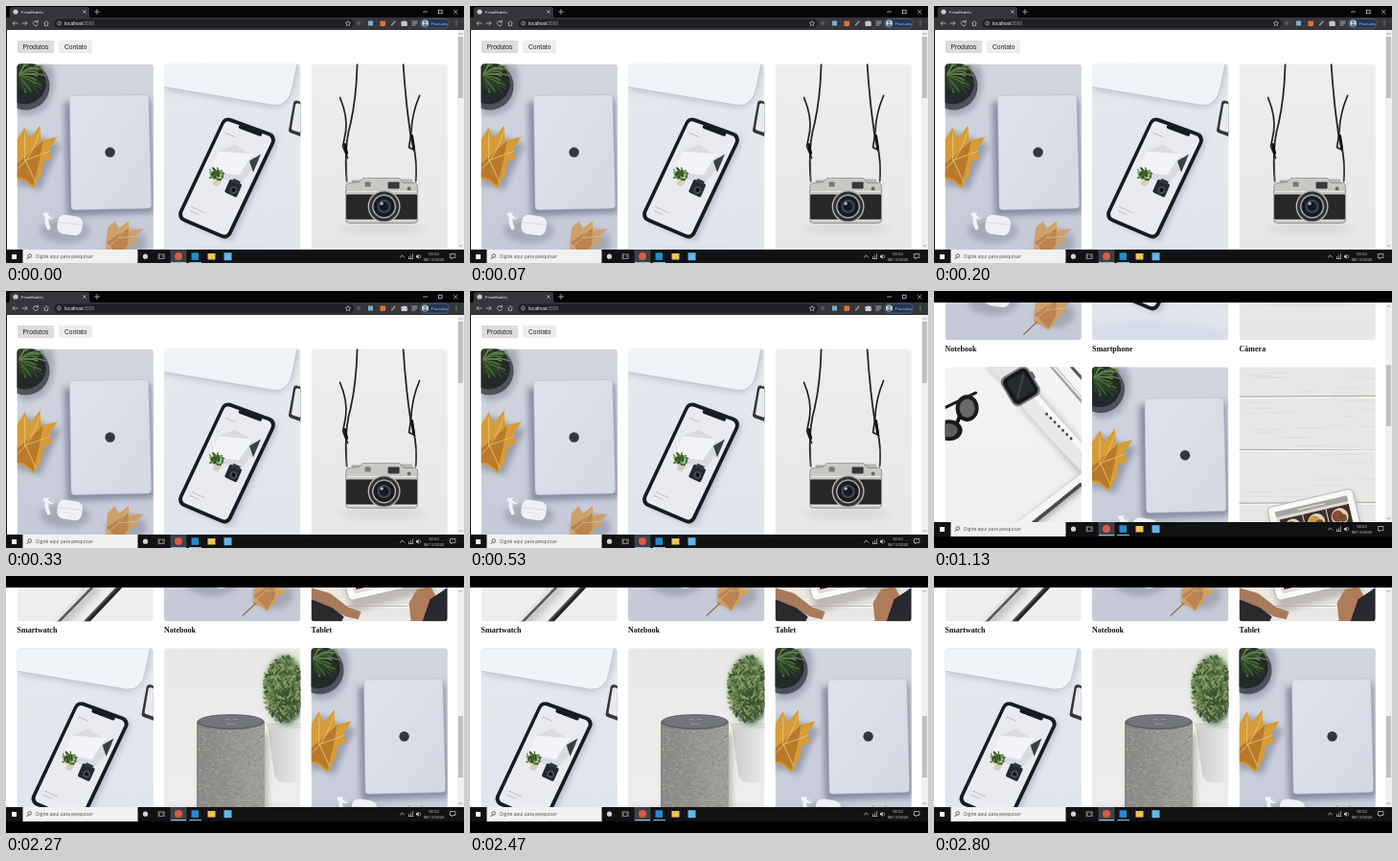
These frames come from a looping animation (478 by 268 pixels, 3.39 s). An HTML page:

```html
<!DOCTYPE html>
<html lang="pt">
<head>
<meta charset="utf-8">
<style>
html, body { margin: 0; width: 100%; height: 100%; overflow: hidden; background: #000; }
svg { display: block; width: 100vw; height: 100vh; }
text { font-family: "Liberation Sans", Arial, sans-serif; }
.title { font: bold 8px "Liberation Serif", "Times New Roman", serif; fill: #111; }
.ui { font-family: "Open Sans", sans-serif; }
</style>
</head>
<body>
<svg id="stage" viewBox="0 0 478 268"></svg>
<script>
const LOOP = 3390;
const COLS = [11.6, 165, 318.6];
const ROW = 241;
const ROWS = [
  [['notebook', 'Notebook'], ['phone', 'Smartphone'], ['camera', 'Câmera']],
  [['watch', 'Smartwatch'], ['notebook', 'Notebook'], ['tablet', 'Tablet']],
  [['phone', 'Smartphone'], ['speaker', ''], ['notebook', 'Notebook']]
];
// Each view: start time, page scroll, scrollbar thumb top, screen offset
const VIEWS = [
  { at: 0, scroll: 0, thumb: 32, lift: 0 },
  { at: 1130, scroll: 222.3, thumb: 77, lift: 13 },
  { at: 2270, scroll: 467.3, thumb: 146, lift: 13 }
];

let seed = 7;
const rnd = () => (seed = (seed * 16807) % 2147483647) / 2147483647;
const between = (a, b) => a + (b - a) * rnd();

const rect = (x, y, w, h, fill, r = 0, more = '') =>
  `<rect x="${x}" y="${y}" width="${w}" height="${h}" rx="${r}" fill="${fill}" ${more}/>`;
const disc = (x, y, r, fill, more = '') => `<circle cx="${x}" cy="${y}" r="${r}" fill="${fill}" ${more}/>`;
const oval = (x, y, rx, ry, fill, more = '') =>
  `<ellipse cx="${x}" cy="${y}" rx="${rx}" ry="${ry}" fill="${fill}" ${more}/>`;
const shape = (d, fill, more = '') => `<path d="${d}" fill="${fill}" ${more}/>`;
const line = (d, color, w = 1, more = '') =>
  `<path d="${d}" fill="none" stroke="${color}" stroke-width="${w}" stroke-linecap="round" ${more}/>`;
// Polygon with corners rounded by a stroke of its own colour
const slab = (d, fill, w, more = '') =>
  shape(d, fill, `stroke="${fill}" stroke-width="${w}" stroke-linejoin="round" ${more}`);
const text = (x, y, s, size, fill, more = '') =>
  `<text x="${x}" y="${y}" font-size="${size}" fill="${fill}" ${more}>${s}</text>`;
const group = (inner, transform) => `<g transform="${transform}">${inner}</g>`;
const fade = (id, a, b, dir = 'x2="0" y2="1"') =>
  `<linearGradient id="${id}" ${dir}><stop stop-color="${a}"/><stop offset="1" stop-color="${b}"/></linearGradient>`;
const soft = 'filter="url(#blur)"';

// Small leaves scattered in an ellipse
function foliage(cx, cy, rx, ry, count, colors, w = 1.4) {
  let out = '';
  for (let i = 0; i < count; i++) {
    const a = between(0, 6.283), r = Math.sqrt(rnd());
    const x = cx + Math.cos(a) * rx * r, y = cy + Math.sin(a) * ry * r;
    out += line(`M${x.toFixed(1)} ${y.toFixed(1)}l${between(-3, 3).toFixed(1)} ${between(-4, 1).toFixed(1)}`,
      colors[i % colors.length], w);
  }
  return out;
}

// Long blades fanning out from one point
function grass(cx, cy, reach, count, colors) {
  let out = '';
  for (let i = 0; i < count; i++) {
    const a = between(-1.5, 1.5), r = reach * between(.5, 1);
    out += line(`M${cx} ${cy}Q${(cx + Math.cos(a) * r * .6).toFixed(1)} ${(cy + Math.sin(a) * r * .6 - 4).toFixed(1)} ` +
      `${(cx + Math.cos(a) * r).toFixed(1)} ${(cy + Math.sin(a) * r * .7).toFixed(1)}`, colors[i % colors.length], 1.3);
  }
  return out;
}

const leaf = 'M0 15 L8 2 L13 14 L24 0 L25 16 L42 12 L33 26 L37 34 L28 38 L25 52 L17 66 L8 58 L0 56Z';

const photos = {
  notebook: () =>
    rect(0, 0, 142.3, 213, 'url(#desk)') +
    shape('M0 0H36Q44 24 30 46Q14 58 0 51Z', '#a3a8b6', soft) +
    disc(9, 23, 25, '#4d535c') + disc(8, 20, 22, '#23292a') +
    grass(2, 12, 33, 46, ['#2f4a28', '#4d6f3a', '#1d2c1d', '#6f8c50']) +
    shape('M2 76L10 70L32 80L46 84L36 104L24 132L8 126L0 128Z', '#969cac', soft) +
    group(shape(leaf, '#d69c37') + shape('M0 40L14 28L27 16L23 38L17 63L7 55L0 54Z', '#b9792a') +
      line('M1 45Q16 33 24 5M10 36L34 27M9 37L19 59M8 37L8 8', '#e9c274', .9), 'translate(0 64)') +
    shape('M49 40L139 36L143 155L52 159Z', '#868da2', soft) +
    shape('M58 33L134 32Q137 32 137.2 35L140 147Q140 150 137 150.4L60 152Q56.5 152 56.4 148L55 37Q55 33 58 33Z', 'url(#metal)', 'stroke="#b9bfcb" stroke-width=".6"') +
    disc(97, 92, 5.2, '#36373c') +
    oval(50, 174, 26, 13, '#a4a9b8', soft) +
    rect(42, 158, 26, 20, '#eff0f5', 7, 'transform="rotate(8 55 168)"') +
    line('M44 165L66 168', '#c9ccd7', .7) +
    line('M32 157Q29 163 33 171M29 157L36 160', '#f2f3f7', 4) +
    line('M33 157L37 160', '#9fa4b0', 1) +
    oval(114, 186, 21, 14, '#a5a7b2', soft) +
    group(shape(leaf, '#cda06a') + shape('M0 40L24 13L25 40L17 63Z', '#b98450') +
      line('M2 48Q17 30 24 4M14 31L37 25', '#e4c296', .9), 'translate(95 162) rotate(4) scale(.9 .6)') +
    line('M96 194L82 207', '#8c7353', 1.2),

  phone: () =>
    rect(0, 0, 142.3, 213, 'url(#pale)') +
    shape('M0 27L112 46Q132 47 138 18L142 0H0Z', '#c3cad6', soft) +
    shape('M0 0H139L134 24Q130 45 114 43L0 24Z', '#f0f3f8') +
    line('M0 24L114 43Q130 45 134 24L139 0', '#bfc6d2', 1) +
    slab('M138 41L150 45V75L133 69Z', '#34363b', 6) +
    slab('M139 43L150 47V72L135 67Z', '#e8eaed', 4) +
    slab('M69 66L112 81L67 178L27 160Z', '#b3bbca', 12, soft) +
    slab('M67 64L108 79L63 174L23 157Z', '#171b24', 16) +
    slab('M67 65L107 79.5L62.5 173L24 156.5Z', '#e9ebf0', 10) +
    line('M80 65.5L100 73', '#171b24', 4.5) +
    shape('M57 91L74 84L100 101L78 127L48 112Z', '#d9dbe1') +
    shape('M57 91L93 94L78 116L48 112Z', '#f3f4f7') +
    shape('M89 101L101 94L93 113Z', '#3b4049') +
    line('M64 72L74 76M29 149L42 155M27 153L36 157', '#a6a8ae', .7) +
    foliage(55, 117, 7, 6, 60, ['#466b30', '#7c9b4e', '#284a26'], 1.4) +
    shape('M52 121L60 122L56 128L51 126Z', '#d6cdb6') +
    group(rect(-7, -8, 14, 15, '#24282f', 2) + rect(-4, -10, 8, 4, '#303744') + disc(1, 1, 4, '#3f4d60') + disc(1, 1, 2, '#0d1115'), 'translate(72 130) rotate(24)') +
    shape('M0 198Q68 184 142 204V213H0Z', '#d6dde8', soft),

  camera: () =>
    rect(0, 0, 142.3, 213, 'url(#wall)') +
    oval(74, 172, 45, 6, '#dad8d8', soft) +
    line('M48 0Q47 36 41 62Q34 86 37 122M96 0Q99 45 104 76Q111 96 109 122', '#24242a', 1.8) +
    line('M30 35Q38 54 36 70L33 86L38 98M113 33Q105 51 104 74L102 87L108 90', '#202025', 1.7) +
    line('M35 84L37 93M105 75L107 88', '#111318', 3) +
    line('M37 103V123M109 104V123', '#55555b', 1) +
    rect(42, 121, 11, 5, '#aaa9a7', 1) + rect(90, 120, 16, 6, '#b9b8b5', 1.5) +
    shape('M50 123L54 119H92L96 124H108Q111 124 111 128V162Q111 166 106 166H40Q36 166 36 162V128Q36 124 40 124Z', '#c8c7c3', 'stroke="#777774" stroke-width=".6"') +
    rect(36.5, 136, 74, 26, '#262729', 1) +
    rect(80, 123, 12, 7, '#34383b', 1) + rect(56, 123, 6, 5, '#74777a', 1) +
    line('M38 133H109M38 163H109', '#f0f0ed', .8) +
    disc(76, 148.5, 17, '#b9b8b4') + disc(76, 148.5, 15.6, '#303234') + disc(76, 148.5, 12.5, '#aaa9a6') +
    disc(76, 148.5, 11, '#17191b') + disc(76, 148.5, 7.3, '#39434c') + disc(76, 148.5, 4.7, '#111820') +
    disc(73.5, 145.5, 1.8, '#a3b0ba') + disc(102, 130, 2, '#676867'),

  watch: () =>
    rect(0, 0, 142.3, 213, 'url(#white)') +
    group(oval(-1, 14, 14, 11, '#191a1d') + oval(18, -9, 12, 14, '#191a1d') +
      oval(-1, 14, 9, 7, '#5e5e60') + oval(18, -9, 8, 10, '#686769') + line('M8 5L10 0', '#15161a', 4), 'translate(5 52)') +
    line('M1 42L32 27', '#1c1c20', 3) +
    line('M57 -3L73 11M88 34L150 105', '#c5c5c7', 25, soft) +
    line('M57 -3L73 11', '#e4e4e5', 23) + line('M88 34Q107 57 151 103', '#e9e9ea', 21) +
    line('M93 29Q116 55 151 94', '#f9f9f9', 5) +
    line('M106 49L134 77', '#46464a', 3, 'stroke-dasharray="0 6"') +
    group(rect(-16, -17, 33, 35, '#77797e', 7) + rect(-14, -15, 29, 31, '#16171a', 6) +
      rect(-10, -11, 21, 23, '#262a2d', 2) + line('M-8 9L9 -8', '#3e4448', 2) + rect(16, -7, 3, 8, '#66696e', 1), 'translate(78 20) rotate(-31)') +
    line('M111 -2L148 41', '#a2a3a7', 5) + line('M111 -3L148 39', '#efeff0', 2) +
    line('M132 0L150 20', '#55565a', 3) +
    line('M144 119L74 175', '#adadb1', 13, soft) + line('M144 116L72 172', '#d3d3d5', 12) +
    line('M145 114L72 170', '#f5f5f5', 8) + line('M141 123L78 174', '#48494d', 4, 'stroke-dasharray=".6 3" stroke-linecap="butt"') +
    line('M82 180L46 216', '#c4c4c7', 9, soft) +
    line('M108 176L72 214', '#242528', 5) + line('M107 175L71 213', '#77787b', 1) +
    line('M79 176L43 213', '#55565a', 4) + line('M76 176L41 212', '#e4e4e6', 3),

  tablet: () => {
    let wood = rect(0, 0, 142.3, 213, '#e9e8e6');
    [31, 86, 142, 197].forEach((y, i) => {
      wood += line(`M0 ${y}L142 ${y + (i % 2 ? 1 : -1)}`, '#aaa8a4', 1.1) + line(`M0 ${y + 1.4}H142`, '#faf9f7', 1);
    });
    for (let i = 0; i < 55; i++)
      wood += line(`M${between(0, 130).toFixed(1)} ${between(0, 213).toFixed(1)}q12 ${between(-1, 1).toFixed(1)} ${between(15, 35).toFixed(1)} 0`, '#d3d1ce', .45);
    const food = (x, c) => rect(x, 15, 24, 21, '#3d302a') + disc(x + 12, 26, 9, '#dfd1b8') +
      disc(x + 10, 25, 6, c) + disc(x + 15, 28, 4, '#755234');
    return wood + shape('M30 151L119 130L130 180L42 204Z', '#bdbab6', soft) +
      group(rect(0, 0, 91, 46, '#f9f9f8', 5, 'stroke="#aeacaa" stroke-width=".8"') + rect(7, 6, 77, 34, '#dedad5') +
        rect(7, 6, 77, 6, '#a7a5a2') + line('M31 9H59', '#f3f2ef', 1) +
        food(10, '#b94f2f') + food(35, '#cf993e') + food(60, '#8e493a'), 'translate(29 147) rotate(-13)') +
      shape('M0 178L20 184L38 198L52 203L49 211L36 208L22 200L0 196Z', '#a87a5c') +
      shape('M0 190L22 199L34 208L32 213H0Z', '#2a292c') +
      shape('M104 213L102 194L110 180L124 176L132 190L122 213Z', '#ae7c5c') +
      shape('M124 190L142 178V213H116Z', '#29292d');
  },

  speaker: () => {
    let dark = '', light = '';
    for (let i = 0; i < 1000; i++) {
      const dash = `M${between(35, 104).toFixed(1)} ${between(82, 190).toFixed(1)}h${between(.5, 1.3).toFixed(1)}`;
      if (i % 2) dark += dash; else light += dash;
    }
    return rect(0, 0, 142.3, 213, 'url(#room)') +
      rect(0, 163, 142, 50, '#e2e2e1', 0, soft) +
      shape('M108 80H150V140H124Q117 139 115 132Z', 'url(#pot)') +
      shape('M107 78H150V84H108Z', '#d6d6d3') +
      oval(126, 42, 20, 34, '#5a7446', soft) + oval(128, 58, 15, 20, '#3f5735', soft) +
      foliage(125, 43, 21, 35, 420, ['#4c6a3d', '#6f8c52', '#37512f', '#8ba166'], 1.8) +
      shape('M37 90H108V193Q72 208 37 193Z', '#b3b3b1', soft) +
      shape('M34 78Q36 69 70 69Q104 69 105 78V188Q104 199 70 199Q35 199 34 188Z', 'url(#cloth)') +
      line(dark, '#7b7977', .6) + line(light, '#b3b0ac', .6) +
      oval(69.5, 77, 35, 8, '#5d6069') + oval(69.5, 76.4, 33, 6.7, '#73757b') +
      line('M64 74H67M73 74H76M65 79H74', '#a9abae', .7);
  }
};

const defs = `<defs>
  <filter id="blur" x="-40%" y="-40%" width="180%" height="180%"><feGaussianBlur stdDeviation="3"/></filter>
  <clipPath id="card"><rect width="142.3" height="213" rx="3.5"/></clipPath>
  <clipPath id="page"><rect y="12" width="478" height="242"/></clipPath>
  ${fade('desk', '#d3d6e0', '#c5c9d8')}${fade('metal', '#dfe3ec', '#d3d8e2', 'x2="1" y2="1"')}
  ${fade('pale', '#e5e9f0', '#dfe5ed')}${fade('wall', '#eeeeee', '#e8e7e7')}
  ${fade('white', '#f4f4f4', '#eeeeef')}${fade('room', '#e9e9e7', '#efefed')}
  ${fade('cloth', '#8a8886', '#a19f9b', 'x2="1" y2="0"')}${fade('pot', '#cbcbc9', '#f0f0ee', 'x2="1" y2="0"')}
  ${Object.entries(photos).map(([id, draw]) => `<g id="${id}" clip-path="url(#card)">${draw()}</g>`).join('')}
</defs>`;

function shop() {
  let out = rect(12, 36, 38, 13, '#dcdcdc', 1) + rect(55, 36, 35, 13, '#ededed', 1) +
    text(17.5, 45, 'Produtos', 6.7, '#222') + text(61, 45, 'Contato', 6.7, '#222');
  ROWS.forEach((row, r) => row.forEach(([photo, name], c) => {
    const y = 60.5 + r * ROW;
    out += `<use href="#${photo}" x="${COLS[c]}" y="${y}"/><text class="title" x="${COLS[c]}" y="${y + 224.5}">${name}</text>`;
  }));
  return out;
}

function browser() {
  const pale = '#c8cacd';
  return rect(0, 0, 478, 12, '#050505') + rect(0, 12, 478, 13, '#35363a') + rect(0, 25, 1, 229, '#18191b') +
    shape('M2 12Q4 12 4 9V3Q4 1 7 1H84Q87 1 87 3V9Q87 12 89 12Z', '#35363a') +
    disc(10, 6, 2.6, '#c6c9cd') + text(16, 7.6, 'FeiraModelo', 4.1, '#f3f3f3') +
    line('M80.5 4.5l3 3m0-3l-3 3M95 3.5v5m-2.5-2.5h5', pale, .7) +
    line('M435.5 6h4M467.5 4.2l3.6 3.6m0-3.6l-3.6 3.6', '#ddd', .7) +
    rect(451.5, 4.2, 3.6, 3.6, 'none', 0, 'stroke="#ddd" stroke-width=".7"') +
    rect(50, 13.5, 313, 9.5, '#202124', 4.7) +
    line('M12 18H7m2-2l-2 2l2 2M17 18h5m-2-2l2 2l-2 2', pale, .7) +
    line('M33 16.2A2.6 2.6 0 1 0 33.5 19M33.4 15v2h-2M39.5 18l2.5-2.4l2.5 2.4M40.5 18v2.5h3V18', pale, .7) +
    disc(55.5, 18, 2, 'none', `stroke="${pale}" stroke-width=".6"`) + line('M55.5 17.8v1', pale, .6) +
    text(61, 20, 'localhost', 5, '#f1f1f1') + text(79.8, 20, ':3000', 5, '#969a9e') +
    shape('M357 15.4l.8 1.8l2 .2l-1.5 1.3l.4 2l-1.7-1l-1.7 1l.4-2l-1.5-1.3l2-.2z', 'none', `stroke="${pale}" stroke-width=".6"`) +
    disc(368, 18, 2, '#55595d') + rect(378, 15.5, 5, 5, '#7fa9d4') +
    rect(390.5, 15.5, 5.5, 5.5, '#df7138', 1) + line('M402.5 20l3.5-4', '#c79087', 1.2) +
    shape('M412.5 16h2a1.2 1.2 0 0 1 2.3 0h1.8v2.2a1 1 0 0 1 0 1.8v1h-6z', pale) +
    line('M424 16h5M424 18h5M424 20h3', pale, .8) +
    rect(432.5, 13.3, 30, 9.7, '#26344e', 4.8, 'stroke="#5d86bc" stroke-width=".5"') +
    disc(437.5, 18, 3.6, '#c1c7ce') + disc(437.5, 16.8, 1.2, '#6b737b') + oval(437.5, 20, 2, 1.3, '#6b737b') +
    text(443.5, 19.6, 'Pausada', 4.4, '#94bdf4') +
    disc(470, 16, .6, pale) + disc(470, 18, .6, pale) + disc(470, 20, .6, pale);
}

function taskbar() {
  const ink = '#d4d4d4';
  return rect(0, 0, 478, 15, '#101214') + rect(6, 5, 5, 5, '#fff') +
    rect(17.5, 0, 120, 15, '#f1f1f1') +
    disc(24.8, 6.5, 1.8, 'none', 'stroke="#333" stroke-width=".7"') + line('M23.5 8l-1.5 1.7', '#333', .8) +
    text(31, 9, 'Digite aqui para pesquisar', 4.9, '#4c4c4c', 'class="ui"') +
    disc(145.5, 7.2, 2.6, ink) +
    rect(160, 5, 4, 4.5, 'none', 0, `stroke="${ink}" stroke-width=".6"`) + line('M159.2 4.5v5.5M165.2 4.5v5.5', ink, .5) +
    rect(171.5, 0, 17, 15, '#3d4144') + disc(180, 7, 4, '#dc5947') +
    rect(193.5, 3.3, 7.5, 7.5, '#238bd0') + rect(210.5, 4, 8, 6.5, '#efc452') + rect(227.5, 3.2, 8, 8, '#63b6e7') +
    rect(172, 13, 16, 1, '#80bde5') + rect(191, 13, 13, 1, '#80bde5') +
    line('M411.5 8l2-2l2 2', ink, .8) +
    line('M420.5 9.5h4M420.5 7.5v2M422.5 6.2v3.3M424.5 4.5v5', ink, .6) +
    shape('M428 6.2h1l1.6-1.5v5L429 8.2h-1z', ink) + line('M432 5.5q1.5 1.7 0 3.4', ink, .6) +
    text(446.5, 5.8, '00:02', 4.2, ink, 'class="ui" text-anchor="middle"') +
    text(446.5, 12, '08/12/2020', 4.1, ink, 'class="ui" text-anchor="middle"') +
    shape('M463.5 4.5h5.5v4h-2.8l-1.2 1.4v-1.4h-1.5z', 'none', `stroke="${ink}" stroke-width=".7"`);
}

const stage = document.getElementById('stage');
stage.innerHTML = defs + rect(0, 0, 478, 268, '#000') +
  `<g clip-path="url(#page)">${rect(0, 12, 478, 242, '#fff')}<g id="shop">${shop()}</g>` +
  rect(471, 12, 7, 242, '#f1f1f1') +
  `<g id="arrows">${line('M473 29.6l1.5-1.6l1.5 1.6M473 249.4l1.5 1.6l1.5-1.6', '#777', .7)}</g>` +
  `<rect id="thumb" x="472" width="5" height="64" fill="#c1c1c1"/></g>` +
  `<g id="browser">${browser()}</g>` +
  `<g id="base">${group(rect(0, 0, 478, 30, '#000') + taskbar(), 'translate(0 254)')}</g>`;

const part = id => document.getElementById(id);
const [page, thumb, chrome, arrows, base] = ['shop', 'thumb', 'browser', 'arrows', 'base'].map(part);
const raise = (el, y) => el.setAttribute('transform', `translate(0 ${-y})`);
let shown;

function draw(ms) {
  const view = VIEWS.filter(v => v.at <= ms).pop();
  if (view === shown) return;
  shown = view;
  raise(page, view.scroll);
  raise(arrows, view.lift);
  raise(base, view.lift);
  thumb.setAttribute('y', view.thumb);
  chrome.setAttribute('visibility', view.lift ? 'hidden' : 'visible');
}

const start = performance.now();
function tick() {
  draw((performance.now() - start) % LOOP);
  requestAnimationFrame(tick);
}
draw(0);
requestAnimationFrame(tick);
</script>
</body>
</html>
```
